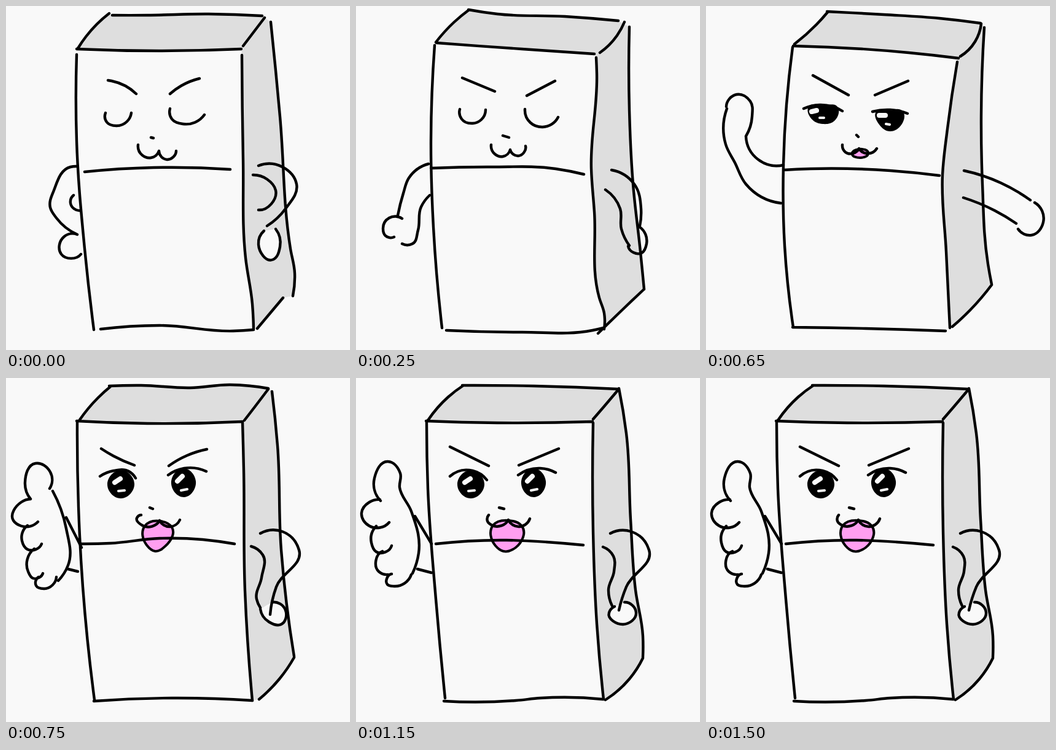
Recreate the animation shown at these times as an HTML page. Size 560x560 px, loop 1750 ms.

```html
<!DOCTYPE html>
<html lang="en">
<head>
<meta charset="utf-8">
<title>Fridge thumbs up</title>
<style>
  html, body { margin: 0; width: 100%; height: 100%; overflow: hidden; background: #f9f9f9; }
  svg { display: block; width: 100vw; height: 100vh; }
  path { fill: none; stroke: #000; stroke-width: 4.4; stroke-linecap: round; stroke-linejoin: round; }
  .side { fill: #dedede; stroke: none; }
  .fist { fill: #f9f9f9; }
  .tongue { fill: #ff9ff0; stroke-width: 4; }
  .pupil { fill: #000; stroke: none; }
  .glint { stroke: #f9f9f9; stroke-width: 8; }
  .spark { stroke: #f9f9f9; stroke-width: 4; }
</style>
</head>
<body>
<svg id="stage" viewBox="0 0 560 560"></svg>
<script>
const STEP = 250;
const stage = document.getElementById('stage');
const minus = (p, q) => [p[0] - q[0], p[1] - q[1]];
const scale = (v, k) => [v[0] * k, v[1] * k];
const unit = v => scale(v, 1 / Math.hypot(...v));

// Curve through "x,y" points; every three neighbours lie on a near-circular arc.
function smooth(text, closed) {
  const pts = text.split(' ').map(p => p.split(',').map(Number));
  const n = pts.length;
  const at = i => pts[(i + n) % n];
  const inner = i => {
    const a = minus(at(i), at(i - 1)), b = minus(at(i + 1), at(i));
    const wa = 1 / (a[0] ** 2 + a[1] ** 2), wb = 1 / (b[0] ** 2 + b[1] ** 2);
    return unit([a[0] * wa + b[0] * wb, a[1] * wa + b[1] * wb]);
  };
  const tangent = i => {
    if (closed || (i > 0 && i < n - 1)) return inner(i);
    const first = i === 0;
    const u = unit(first ? minus(pts[1], pts[0]) : minus(pts[n - 1], pts[n - 2]));
    if (n < 3) return u;
    const t = inner(first ? 1 : n - 2);
    return minus(scale(u, 2 * (t[0] * u[0] + t[1] * u[1])), t);
  };
  let d = 'M' + pts[0];
  for (let i = 0; i < (closed ? n : n - 1); i++) {
    const j = (i + 1) % n;
    const reach = Math.hypot(...minus(pts[j], pts[i])) * 0.36;
    const from = minus(pts[i], scale(tangent(i), -reach));
    const to = minus(pts[j], scale(tangent(j), reach));
    d += `C${from} ${to} ${pts[j]}`;
  }
  return d + (closed ? 'Z' : '');
}

class Pose {
  constructor() {
    this.group = document.createElementNS('http://www.w3.org/2000/svg', 'g');
    stage.append(this.group);
  }
  path(kind, d) {
    this.group.insertAdjacentHTML('beforeend', `<path class="${kind}" d="${d}"/>`);
  }
  draw(kind, text, closed) {
    this.path(kind, text.split('|').map(s => smooth(s, closed)).join(''));
  }
  // The rim strokes run once around the shaded sides, so they also make the fill.
  box(rim, edges) {
    const outline = rim.split('|').map(s => smooth(s)).join('');
    this.path('side', 'M' + outline.slice(1).replaceAll('M', 'L') + 'Z');
    this.path('ink', outline);
    this.draw('ink', edges);
  }
  roundEyes() {
    this.draw('pupil', '187,150 209,172 187,196 165,174|289,147 309,168 290,194 269,172', true);
    this.draw('glint', '177,170 186,164|279,168 287,160');
    this.draw('spark', '183,184 193,183|285,183 295,181');
  }
}

const hips = new Pose();
hips.box(
  '117,69 130,50 168,12|173,15 230,15 330,13 417,16|431,26 446,180 463,395 470,435 467,472|451,475 409,525|403,526 401,485 390,410 386,250 384,80|383,70 250,73 115,70',
  '115,79 115,220 128,395 143,527|154,526 250,520 370,529 403,527|386,65 421,19|128,270 240,263 365,266');
hips.draw('ink', '166,121 172,122 212,143|267,143 285,130 315,118|162,174 164,189 180,195 197,188 204,174|267,167 270,184 288,192 323,177|236,214 240,215|215,226 222,243 236,247 249,236|249,236 262,250 277,236');
hips.draw('fist', '420,366 411,388 434,413 446,392 439,363');
hips.draw('ink', '116,261 105,262 78,300 72,328 82,345 116,372|110,308 105,321 121,333|116,372 94,376 90,404 122,404|411,260 450,262 473,290 455,330 425,358|402,275 425,282 439,300 411,332');

const relaxed = new Pose();
relaxed.box(
  '130,59 160,26 183,7|183,6 230,13 340,17 427,24|445,34 445,170 451,290 463,400 469,461|469,461 430,498 394,533|404,526 404,500 396,475 388,335 383,265 392,110 391,84|388,78 270,70 131,60',
  '128,64 122,220 126,360 140,524|147,528 270,531 385,528 403,524|397,76 425,48 437,26|122,264 220,262 325,265 371,274');
relaxed.draw('ink', '173,117 226,139|278,146 324,122|169,168 172,184 190,191 204,185 211,169|275,168 284,190 304,197 329,181|239,211 249,214|220,226 226,241 239,245 251,234|251,234 264,244 276,228');
relaxed.draw('ink', '118,257 86,280 77,305 68,341|75,346 54,345 44,362 48,374 62,376|120,308 106,327 101,365 92,387 75,387|416,267 453,290 464,330 462,358|406,299 430,330 432,363 445,390|462,360 473,387 465,402 443,391');

const swing = new Pose();
swing.box(
  '144,62 180,30 198,10|197,9 290,14 380,20 447,28|453,35 448,180 450,290 459,420 465,453|465,454 430,495 401,522|397,524 391,400 385,275 393,200 409,91|411,85 330,76 142,65',
  '141,67 126,260 128,390 142,523|141,523 260,525 390,529|414,82 438,58 448,29|126,267 170,265 300,268 380,276');
swing.draw('tongue', '238,240 249,233 264,240 252,247', true);
swing.draw('pupil', '167,164 190,162 214,164 209,187 190,192 172,184|277,172 298,169 320,171 316,196 300,204 282,193', true);
swing.draw('glint', '172,172 180,170|282,178 292,178');
swing.draw('spark', '185,182 192,182|293,192 299,193');
swing.draw('ink', '174,113 232,145|275,145 329,122|159,167 185,161 222,171|271,172 300,169 328,175|245,210 248,213|222,226 227,238 249,232|249,232 262,240 278,232');
swing.draw('ink', '122,321 65,290 47,255 32,225 34,167|33,164 50,144 72,155 75,180 65,212|65,212 85,250 126,259|420,268 480,288 528,316|419,312 470,333 505,354|535,320 549,352 530,373 508,363');

const thumbLow = new Pose();
thumbLow.draw('tongue', '226,241 251,233 270,243 259,274 243,282 229,272', true);
thumbLow.box(
  '120,68 150,32 170,14|168,13 220,12 300,16 365,11 427,17|433,22 442,110 448,280 469,453|469,455 445,490 412,523|401,525 389,346 387,150 385,71|385,71 230,74 115,70',
  '116,70 118,210 125,340 144,524|143,526 270,521 401,525|388,69 405,47 427,18|123,270 170,269 250,261 372,270');
thumbLow.roundEyes();
thumbLow.draw('ink', '155,115 175,127 209,142|265,143 295,126 327,116|153,160 175,151 200,152 211,163|264,158 290,147 326,152|234,211 239,213|220,223 213,228 222,240 250,232|250,232 267,242 283,231');
thumbLow.draw('fist', '433,365 455,378 448,401 428,397 414,376');
thumbLow.draw('ink', '40,197 31,170 48,139 72,153 71,180|76,184 98,245 101,305 85,330|98,227 123,276|101,311 117,315|40,197 25,202 12,232 25,241 52,234|35,240 26,265 35,279 58,270|46,278 36,315 44,326 60,318|53,324 49,338 62,343 82,324');
thumbLow.draw('ink', '414,253 450,250 477,280 440,340 430,385|399,274 418,288 416,325 408,360 414,374');

const thumbHigh = new Pose();
thumbHigh.draw('tongue', '223,240 249,232 270,241 260,276 240,282 227,273', true);
thumbHigh.box(
  '117,69 150,31 175,12|173,12 290,13 427,18|428,17 440,90 447,230 455,345 467,420 467,455|467,456 445,490 406,524|403,523 392,400 386,250 386,73|385,71 230,73 114,70',
  '115,70 117,180 130,360 145,521|143,526 260,525 300,521 402,523|386,67 405,45 427,19|130,270 245,264 310,267 370,272');
thumbHigh.roundEyes();
thumbHigh.draw('ink', '153,112 216,143|265,142 330,115|153,160 190,151 213,166|264,158 300,147 325,154|233,211 241,213|216,223 214,233 222,240 248,231|248,231 265,242 283,229');
thumbHigh.draw('fist', '437,365 456,382 435,401 412,382 421,372');
thumbHigh.draw('ink', '40,200 30,163 52,136 72,155 71,178 90,217 102,285 92,318|96,225 123,270|100,311 123,317|39,198 22,202 9,220 22,241 54,235|33,241 25,268 33,283 58,273|43,282 37,315 52,320|58,319 51,336 62,339 90,320');
thumbHigh.draw('ink', '414,253 448,250 477,280 440,340 428,378|402,275 419,290 420,315 411,345 417,371');

const sequence = [hips, relaxed, swing, thumbLow, thumbHigh, thumbLow, thumbHigh];

function show(time) {
  const current = sequence[Math.floor(time / STEP) % sequence.length];
  for (const pose of new Set(sequence)) {
    pose.group.setAttribute('visibility', pose === current ? 'visible' : 'hidden');
  }
}

const start = performance.now();
function tick() {
  show(performance.now() - start);
  requestAnimationFrame(tick);
}
tick();
</script>
</body>
</html>
```
